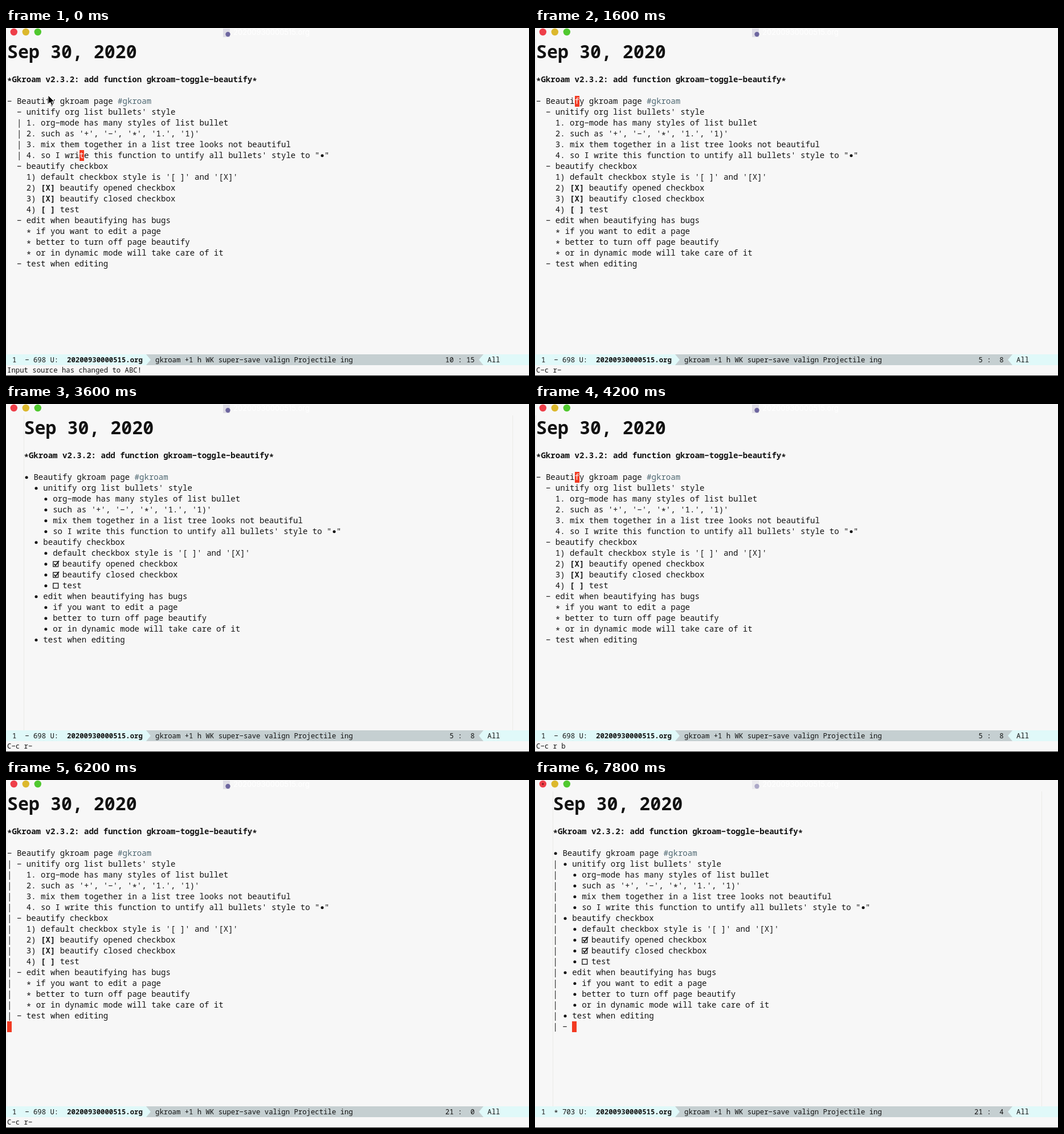
Animation, 918 px wide and 610 px high, one loop 8 s. Source, as an HTML page with a canvas:

```html
<!DOCTYPE html>
<html lang="en">
<head>
<meta charset="utf-8">
<title>Editor page beautify</title>
<style>
html, body { margin: 0; width: 100%; height: 100%; overflow: hidden; background: #f7f7f7; }
canvas { display: block; }
</style>
</head>
<body>
<canvas id="stage" width="918" height="610"></canvas>
<script>
const ctx = document.getElementById("stage").getContext("2d");
const LOOP = 8000, CH = 8.44, ROW = 19;
const BG = "#f7f7f7", INK = "#121212", TAG = "#4c6670", RED = "#f23a22";
const CYAN = "#e0f9f9", GRAY = "#c5cfd1";
const FAMILY = '"Noto Sans Mono", "DejaVu Sans Mono", monospace';
const BODY = 14.07, SMALL = 12.305, HEAD = 31.65;
const FIRST = 5;

// level, plain marker, text, checkbox
const items = [
  [0, "-", "Beautify gkroam page "],
  [1, "-", "unitify org list bullets' style"],
  [2, "1.", "org-mode has many styles of list bullet"],
  [2, "2.", "such as '+', '-', '*', '1.', '1)'"],
  [2, "3.", "mix them together in a list tree looks not beautiful"],
  [2, "4.", "so I write this function to untify all bullets' style to \"•\""],
  [1, "-", "beautify checkbox"],
  [2, "1)", "default checkbox style is '[ ]' and '[X]'"],
  [2, "2)", "beautify opened checkbox", "X"],
  [2, "3)", "beautify closed checkbox", "X"],
  [2, "4)", "test", " "],
  [1, "-", "edit when beautifying has bugs"],
  [2, "*", "if you want to edit a page"],
  [2, "*", "better to turn off page beautify"],
  [2, "*", "or in dynamic mode will take care of it"],
  [1, "-", "test when editing"]
];

// Each step overrides part of the state from its time onwards.
const steps = [
  [0, { line: 10, col: 15, echo: "Input source has changed to ABC!", mouse: true,
        pretty: false, cursor: true, typed: "", size: 698 }],
  [400, { line: 5, col: 8, echo: "" }],
  [1200, { mouse: false }],
  [1400, { echo: "C-c-" }],
  [1600, { echo: "C-c r-" }],
  [1800, { echo: "C-c r b", pretty: true }],
  [2400, { cursor: false }],
  [2800, { cursor: true, echo: "" }],
  [3400, { cursor: false, echo: "C-c-" }],
  [3600, { echo: "C-c r-" }],
  [3800, { echo: "C-c r b", pretty: false, cursor: true }],
  [4600, { line: 8, echo: "" }],
  [4800, { line: 12 }],
  [5000, { line: 16 }],
  [5200, { line: 19 }],
  [5400, { line: 20 }],
  [5600, { line: 21, col: 0 }],
  [6000, { echo: "C-c-" }],
  [6200, { echo: "C-c r-" }],
  [6400, { echo: "C-c r b", pretty: true }],
  [7000, { cursor: false }],
  [7200, { cursor: true, echo: "" }],
  [7400, { typed: "  ", col: 2, size: 701 }],
  [7600, { typed: "  -", col: 3, size: 702 }],
  [7800, { typed: "  - ", col: 4, size: 703 }]
];

const stateAt = t => Object.assign({}, ...steps.filter(s => s[0] <= t).map(s => s[1]));
const rowTop = line => 119 + (line - FIRST) * ROW;

// Dashes are wide; stars and bullets sit at the middle of the line.
function text(str, x, y, size = BODY, color = INK, weight = 400) {
  ctx.font = `${weight} ${size}px ${FAMILY}`;
  ctx.fillStyle = color;
  const step = ctx.measureText("0").width;
  ctx.fillText(str.replace(/-/g, "\u2212").replace(/[*•]/g, " "), x, y);
  [...str].forEach((c, i) => {
    if (c === "*") ctx.fillText(c, x + i * step, y + size * 0.2);
    if (c === "•") dot(x + (i + 0.5) * step + 0.4, y - size * 0.3, size * 0.18, color);
  });
}

function rect(x, y, w, h, color) {
  ctx.fillStyle = color;
  ctx.fillRect(x, y, w, h);
}

function dot(x, y, r, color) {
  ctx.fillStyle = color;
  ctx.beginPath();
  ctx.arc(x, y, r, 0, Math.PI * 2);
  ctx.fill();
}

function path(points, fill) {
  ctx.beginPath();
  points.forEach(([x, y], i) => i ? ctx.lineTo(x, y) : ctx.moveTo(x, y));
  if (fill) {
    ctx.closePath();
    ctx.fillStyle = fill;
    ctx.fill();
  }
}

function checkbox(x, y, checked) {
  ctx.strokeStyle = INK;
  ctx.lineWidth = 1.3;
  ctx.strokeRect(x + 0.7, y + 5.2, 8.8, 8.8);
  if (!checked) return;
  ctx.lineWidth = 1.8;
  path([[x + 2.5, y + 9], [x + 4.8, y + 12], [x + 10.8, y + 4]]);
  ctx.stroke();
}

function titleBar(s) {
  ["#ee3f49", "#dcb82d", "#50c82f"].forEach((color, i) => dot(13.8 + i * 21, 7, 6.2, color));
  if (s.typed) dot(13.8, 7, 1.8, "#841a20");
  ctx.globalAlpha = s.typed ? 0.5 : 1;
  rect(381, 1, 12, 15, "#dfdde6");
  dot(389.5, 11, 4.2, "#6d669f");
  ctx.globalAlpha = 1;
  ctx.font = '400 13px Inter, "Open Sans", sans-serif';
  ctx.fillStyle = "#ffffff";
  ctx.fillText("20200930000515.org", 399, 12);
}

function drawItem(item, index, left, pretty) {
  const [level, mark, label, check] = item;
  const y = rowTop(FIRST + index), base = y + 14;
  const x = left + level * 2 * CH;
  const bullet = pretty ? "•" : mark;
  let at = x + (bullet.length + 1) * CH;
  text(bullet, x, base);
  if (check) {
    if (pretty) checkbox(at, y, check === "X");
    else text(`[${check}]`, at, base, BODY, INK, 700);
    at += (pretty ? 2 : 4) * CH;
  }
  text(label, at, base);
  if (index === 0) text("#gkroam", at + label.length * CH, base, BODY, TAG);
}

// Vertical guides beside the list block that holds the cursor.
function guides(s, left) {
  const here = s.line - FIRST;
  const level = here < items.length ? items[here][0] : 1;
  if (level === 0) return;
  let from = Math.min(here, items.length - 1), to = from;
  const inside = i => items[i] && items[i][0] >= level;
  while (inside(from - 1)) from--;
  while (inside(to + 1)) to++;
  if (s.typed) to++;
  for (let i = from; i <= to; i++) {
    text("|", left + (level - 1) * 2 * CH, rowTop(FIRST + i) + 14);
  }
}

function charAt(s) {
  const item = items[s.line - FIRST];
  if (!item) return "";
  return (" ".repeat(item[0] * 2) + item[1] + " " + item[2])[s.col] || "";
}

function page(s) {
  const left = s.pretty ? 31.5 : 2;
  if (s.pretty) {
    rect(31, 20, 1, 552, "#ebebe8");
    rect(889, 20, 1, 552, "#ebebe8");
  } else {
    rect(1, 20, 1, 552, "#e9e9e9");
  }
  text("Sep 30, 2020", left, 53, HEAD, INK, 700);
  text("*Gkroam v2.3.2: add function gkroam-toggle-beautify*", left, 95, BODY, INK, 700);
  items.forEach((item, i) => drawItem(item, i, left, s.pretty));
  guides(s, left);
  if (s.typed) text(s.typed, left, rowTop(21) + 14);
  if (s.cursor) {
    const x = left + s.col * CH, y = rowTop(s.line);
    rect(Math.round(x), y, 8, ROW, RED);
    text(charAt(s), x, y + 14, BODY, BG);
  }
}

function modeLine(s) {
  const top = 572, mid = 581.5, end = 591;
  const base = 586, pad = n => String(n).padStart(2);
  rect(0, top, 918, end - top, GRAY);
  path([[0, top], [246, top], [254, mid], [246, end], [0, end]], CYAN);
  path([[918, top], [838, top], [830, mid], [838, end], [918, end]], CYAN);
  text(`1  ${s.typed ? "*" : "-"} ${s.size} U:`, 11, base, SMALL);
  text("20200930000515.org", 107, base, SMALL, INK, 700);
  text("gkroam +1 h WK super-save valign Projectile ing", 262, base, SMALL);
  text(`${pad(s.line)} : ${pad(s.col)}`, 771, base, SMALL);
  text("All", 845, base, SMALL);
  text(s.echo, 2, 604, SMALL);
  rect(0, 609, 918, 1, "#1a1a1a");
}

function pointer(x, y) {
  path([[0, 0], [0, 15.5], [3.6, 12.2], [6, 18], [8.7, 16.8], [6.3, 11.3], [11, 11]]
    .map(([px, py]) => [x + px, y + py]), "#0a0a0a");
  ctx.strokeStyle = "#ffffff";
  ctx.lineWidth = 1;
  ctx.stroke();
}

function draw(now) {
  const s = stateAt(now % LOOP);
  rect(0, 0, 918, 610, BG);
  titleBar(s);
  page(s);
  modeLine(s);
  if (s.mouse) pointer(74, 118);
}

const start = performance.now();
function tick() {
  draw(performance.now() - start);
  requestAnimationFrame(tick);
}
tick();
</script>
</body>
</html>
```
